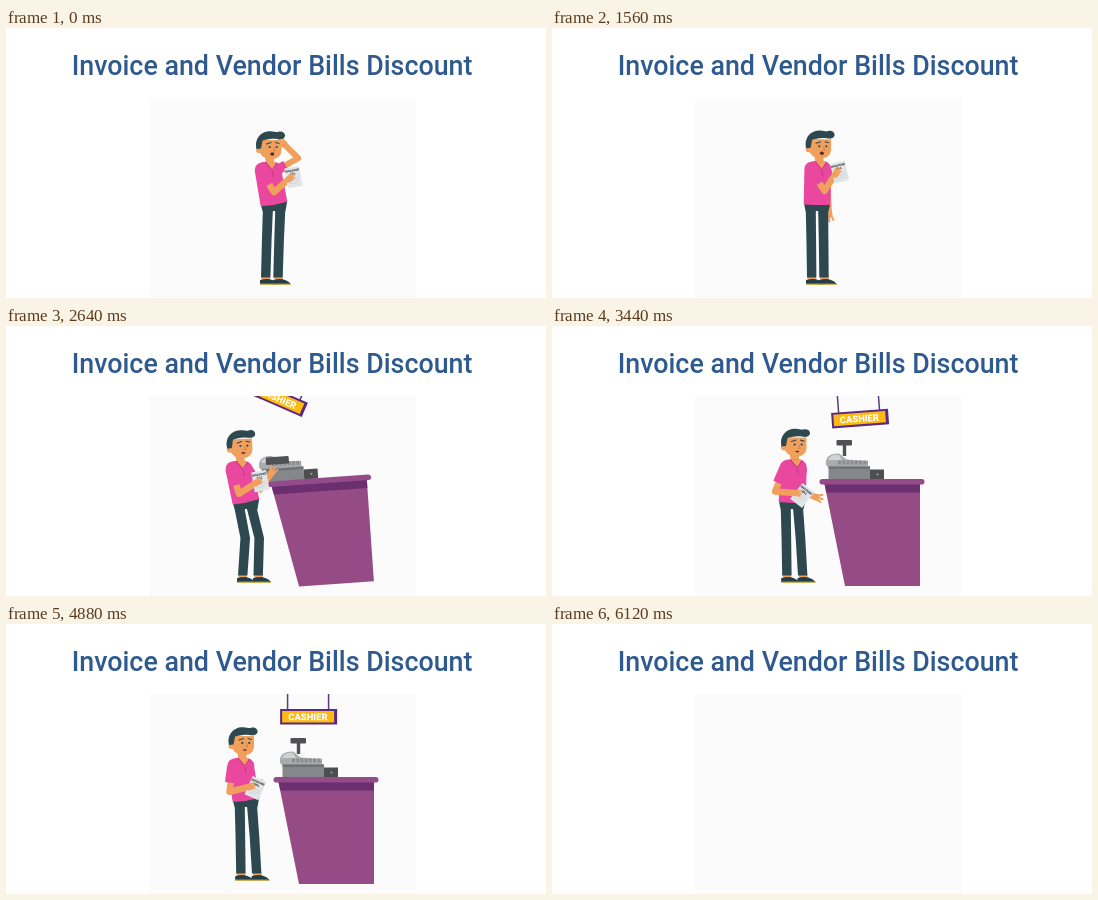
Write an HTML page that moves like this. It is 540 px wide and 270 px high and loops after 6520 ms.

```html
<!DOCTYPE html>
<html lang="en">
<head>
<meta charset="utf-8">
<title>Invoice and Vendor Bills Discount</title>
<style>
  html, body { margin: 0; width: 100%; height: 100%; overflow: hidden; background: #fff; }
  svg { display: block; width: 100vw; height: 100vh; }
  text { font-family: Roboto, "Open Sans", sans-serif; }
  .skin { fill: #f0a05c; }
  .skinLine { fill: none; stroke: #f0a05c; stroke-linecap: round; stroke-linejoin: round; }
  .pinkLine { fill: none; stroke: #ea489f; }
  .dark { fill: #2e484f; }
  .brow { fill: none; stroke: #2e484f; stroke-width: 1.1; stroke-linecap: round; }
</style>
</head>
<body>
<svg viewBox="0 0 540 270">
  <defs>
    <clipPath id="frame"><rect x="143" y="70" width="267" height="200"/></clipPath>
    <g id="shoe">
      <rect class="skin" x="1.5" y="-2" width="8.5" height="4"/>
      <path d="M0 6V2Q5 .2 10 1Q16 2.6 18 6Z" fill="#233d49"/>
      <path d="M0 6H18" stroke="#c9a93c" stroke-width="1.2"/>
    </g>
  </defs>
  <text x="65.7" y="47" font-size="26.8" font-weight="500" fill="#2f5a8f">Invoice and Vendor Bills Discount</text>
  <rect x="143" y="70" width="267" height="200" fill="#fbfbfb"/>
  <g clip-path="url(#frame)">
    <g id="scene">
      <g id="sign">
        <path d="M281.5 5V86M322.5 5V86" stroke="#5b3a86" stroke-width="1.5"/>
        <rect x="274" y="85" width="57" height="15.5" fill="#5a2a82"/>
        <rect x="276" y="87" width="52" height="11.5" fill="#fdbb11"/>
        <text x="301.8" y="96.2" font-size="9.4" font-weight="800" fill="#fff" text-anchor="middle">CASHIER</text>
      </g>
      <g id="desk">
        <g id="register">
          <path d="M274 139C273 131 278 127.5 286 127.5C290 128 291 132 295 133.5L316 135V141H276Z" fill="#a9abae"/>
          <path d="M276 134C278 129 283 128 287 129L290 134Z" fill="#d0d2d4"/>
          <path d="M286 136.5H316" stroke="#8b8d91" stroke-width="4" stroke-dasharray="3 1.2"/>
          <rect x="276.5" y="140" width="41.5" height="13.5" fill="#85878a"/>
          <path d="M276.5 142H318" stroke="#696b6f" stroke-width="1.6"/>
          <rect x="318" y="143.5" width="14" height="10" fill="#4c4e50"/>
          <circle cx="325.5" cy="148.5" r="1.1" fill="#9a9c9e"/>
          <g fill="#505155">
            <rect id="post" x="290.8" width="3.4"/>
            <rect id="bar" rx="1"/>
          </g>
        </g>
        <path d="M272.5 158H368V260H293Z" fill="#944b86"/>
        <path d="M272.5 158H368V166.5H274.4Z" fill="#6b2f70"/>
        <rect x="267.5" y="153" width="105" height="5.6" rx="2.8" fill="#944b8a"/>
      </g>
      <g id="man">
        <path id="farSkin" class="skinLine" stroke-width="6"/>
        <path id="farSleeve" class="pinkLine" stroke-width="10"/>
        <g id="farHand">
          <ellipse class="skin" rx="4" ry="3.4"/>
          <path class="skinLine" stroke-width="2" d="M1 -2L6 -4M2 0H7.5M1 2L6 3.2"/>
        </g>
        <use id="shoeL" href="#shoe"/>
        <use id="shoeR" href="#shoe"/>
        <path id="legs" class="dark"/>
        <path id="neck" class="skinLine" stroke-width="8.5" style="stroke-linecap:butt"/>
        <path id="shirt" fill="#ea489f"/>
        <g id="collar">
          <path class="skin" d="M-3 -5H7L3.5 3Z"/>
          <path d="M-4 -5L2.5 3L8 -4M3 4L4 10" fill="none" stroke="#c73384"/>
        </g>
        <g id="head">
          <path class="skin" d="M-11 -6H11.5V4C11.5 10 7 13.2 2 13.2C-6 13.2 -10.5 9 -11 3Z"/>
          <circle class="skin" cx="-11" cy="4" r="3"/>
          <path class="dark" d="M-13.5 3C-16 -7 -9 -15 0 -14.8C4 -15 6 -13.5 8 -14C12 -15.5 15.3 -13 15 -10C14.5 -6.5 10 -6.3 7 -7C1 -8 -4 -6.5 -7.5 -5.5L-9 2.5Z"/>
          <path class="brow" d="M-3.5 -2L1 -3.5M5.5 -3.5L9 -2.5"/>
          <circle class="dark" cx="-.3" cy="1" r="1.1"/><circle class="dark" cx="6.7" cy="1" r="1.1"/>
          <path d="M3.8 1.5L5.3 4.8H3.3" fill="none" stroke="#d17c3f" stroke-width=".9"/>
          <ellipse id="mouth" cx="2.3" cy="8" rx="2" fill="#5a2a2c"/>
        </g>
        <path id="nearSkin" class="skinLine" stroke-width="6.5"/>
        <path id="nearSleeve" class="pinkLine" stroke-width="11.5"/>
        <g id="paper">
          <rect id="cash" x="2" y="5" width="5" height="7" fill="#2f9a5c"/>
          <rect x="-7.5" y="-10" width="15" height="20" fill="#e1e5e8"/>
          <g font-size="2.9" font-weight="900" fill="#25282b" text-anchor="middle">
            <text y="-5.6">DISCOUNT</text><text y="-2.5">BILL</text>
          </g>
          <path d="M-5 1H5M-5 3.5H5M-5 6H3" stroke="#ccd2d6" stroke-width=".8"/>
        </g>
        <g id="nearHand">
          <ellipse class="skin" rx="4" ry="3.3"/>
          <path class="skinLine" stroke-width="2" d="M1 -2L5.5 -2.6M2 0H6M1 2L5 2.4"/>
        </g>
      </g>
    </g>
  </g>
</svg>
<script>
const LOOP = 6520, STEP = 40, ARRIVE = 2640;
const el = {};
document.querySelectorAll('[id]').forEach(e => el[e.id] = e);

function put(id, attrs) {
  for (const name in attrs) el[id].setAttribute(name, attrs[name]);
}
const move = (id, x, y, a = 0) => put(id, { transform: `translate(${x} ${y}) rotate(${a})` });
const clamp = u => Math.max(0, Math.min(1, u));
const ease = (t, start, end) => {
  const u = clamp((t - start) / (end - start));
  return u * u * (3 - 2 * u);
};
const mix = (a, b, u) => a.map((v, i) => v + (b[i] - v) * u);
const line = pts => 'M' + pts.map(p => p.join(' ')).join('L');

// Key poses, each reached between start and end; the rest of the body follows
const poses = [
  { start: 0, end: 1, head: [264, 118], hip: [268], feet: [255, 267.3], near: [283, 151], far: [278, 116], tilt: [-10] },
  { start: 700, end: 1300, head: [267.6, 117.3], hip: [265], near: [283.5, 146], far: [277, 186], tilt: [-13] },
  { start: 2080, end: ARRIVE, head: [234.7, 119], hip: [240], feet: [232, 247.5], near: [250, 157], far: [265.5, 147], tilt: [-10] },
  { start: 2700, end: 3200, head: [243, 117.6], feet: [230.2, 246], near: [243, 167], far: [263.5, 171], tilt: [38] },
  { start: 3500, end: 4000, head: [236.5, 118], near: [243, 163], far: [250, 161], tilt: [24] },
  { start: 4800, end: 5440, head: [238, 117], near: [242.5, 162.5], far: [261, 151], tilt: [26] }
];

function poseAt(t) {
  const now = { ...poses[0] };
  for (const p of poses) {
    const u = ease(t, p.start, p.end);
    for (const part in p) if (Array.isArray(p[part])) now[part] = mix(now[part], p[part], u);
  }
  return now;
}

// Jelly lean of the moving scene, in degrees: builds up, then rings out
function rock(t) {
  const s = (t - ARRIVE) / 800;
  if (s < 0) return -4 * ease(t, 2200, ARRIVE);
  return -4 * clamp(1 - s) ** 2 * Math.cos(2.5 * Math.PI * s);
}

// Two-bone arm; the elbow falls on the clockwise side
function arm(name, [sx, sy], [hx, hy], upper, lower, cover) {
  const dist = Math.hypot(hx - sx, hy - sy);
  const d = Math.max(upper - lower, Math.min(upper + lower, dist));
  const bend = Math.acos(clamp((upper ** 2 + d ** 2 - lower ** 2) / (2 * upper * d)));
  const a = Math.atan2(hy - sy, hx - sx) + bend;
  const elbow = [sx + upper * Math.cos(a), sy + upper * Math.sin(a)];
  const cuff = mix([sx, sy], elbow, cover);
  put(name + 'Sleeve', { d: line([[sx, sy], cuff]) });
  put(name + 'Skin', { d: line([mix([sx, sy], cuff, .8), elbow, [hx, hy]]) });
  move(name + 'Hand', hx, hy, Math.atan2(hy - elbow[1], hx - elbow[0]) * 180 / Math.PI);
}

function leg(top, side, foot, knee) {
  const hipY = 174, kneeY = 212, ankle = 249.5;
  const x = top + side * 6.2, k = (x + foot + 4.7) / 2 + knee;
  return line([[x - 6.8, hipY], [x + 6.8, hipY], [x + 5, 184], [k + 4.8, kneeY],
    [foot + 9.4, ankle], [foot, ankle], [k - 4.8, kneeY], [x - 5, 184]]) + 'Z';
}

function drawMan(t) {
  const p = poseAt(t);
  const [hx, hy] = p.head, [px] = p.hip, [fl, fr] = p.feet, [tilt] = p.tilt;
  const cx = hx - 1.7, cy = hy + 20, py = 176.5;
  const lean = px - cx, knee = Math.max(0, -rock(t));
  const scratch = t < 720 ? Math.sin(t / 720 * 4 * Math.PI) : 0;

  move('head', hx, hy, scratch * 2 - knee * .7);
  put('mouth', { ry: 1.7 - .9 * ease(t, 2200, 2600) });
  put('neck', { d: line([[hx - 1, hy + 9], [cx + 2, cy]]) });
  move('collar', cx + 1, cy + 1);
  const left = py + lean * .3, right = py - lean * .5;
  put('shirt', { d: `M${cx - 5} ${cy - 4}Q${cx - 14} ${cy - 3} ${cx - 13.5} ${cy + 5}L${px - 13.3} ${left}` +
    `Q${px} ${py + 1} ${px + 13.3} ${right}L${cx + 13.5} ${cy + 6}Q${cx + 14} ${cy - 2} ${cx + 7} ${cy - 4}Z` });
  put('legs', { d: leg(px, -1, fl, knee) + leg(px, 1, fr, knee) +
    `M${px - 13} ${left - 1}L${px + 13.3} ${right - 1}L${px + 11.5} 183H${px - 11.5}Z` });
  move('shoeL', fl - 1, 250.2);
  move('shoeR', fr - .5, 250.2);

  const [nx, ny] = p.near, [gx, gy] = p.far;
  arm('near', [cx - 8, cy + 4], [nx, ny], 26, 20, .65);
  arm('far', [cx + 9, cy + 4], [gx + scratch, gy - scratch * 2], 24, 20, .4);
  move('paper', nx + 5 + tilt * .06, ny - 1 + tilt * .09, tilt);
  put('cash', { opacity: t > 3880 && t < 4480 ? 1 : 0 });
}

function drawDesk(t) {
  const lean = rock(t), x = 150 * (1 - ease(t, 1780, 2520));
  put('desk', { transform: `translate(${x} ${lean / 2}) rotate(${lean} 330 260)` });
  move('register', lean * 3.1, 0);
  const fold = 1 - ease(t, ARRIVE + 10, 2960);
  put('bar', { x: 284.5 - 3.5 * fold, y: 114 + 15 * fold, width: 15.5 + 7.5 * fold, height: 5.5 + 2 * fold });
  put('post', { y: 118 + 12 * fold, height: 12 * (1 - fold) });
}

function drawSign(t) {
  const s = Math.max(0, (t - ARRIVE) / 1000);
  const swing = 23.5 * Math.exp(-2.1 * s) * Math.cos(2 * Math.PI * s / 1.7);
  const left = 1 - clamp((t - 2440) / 400);
  put('sign', {
    transform: `translate(0 ${-56 * left ** 2}) rotate(${swing} 302.5 18)`,
    display: t < 2440 ? 'none' : 'inline'
  });
}

function draw(now) {
  const t = Math.floor((now % LOOP) / STEP) * STEP;
  put('scene', { display: t >= 6120 ? 'none' : 'inline' });
  move('scene', -240 * clamp((t - 5560) / 540) ** 3, 0);
  drawMan(t);
  drawDesk(t);
  drawSign(t);
}

function tick() {
  draw(performance.now());
  requestAnimationFrame(tick);
}
tick();
</script>
</body>
</html>
```
